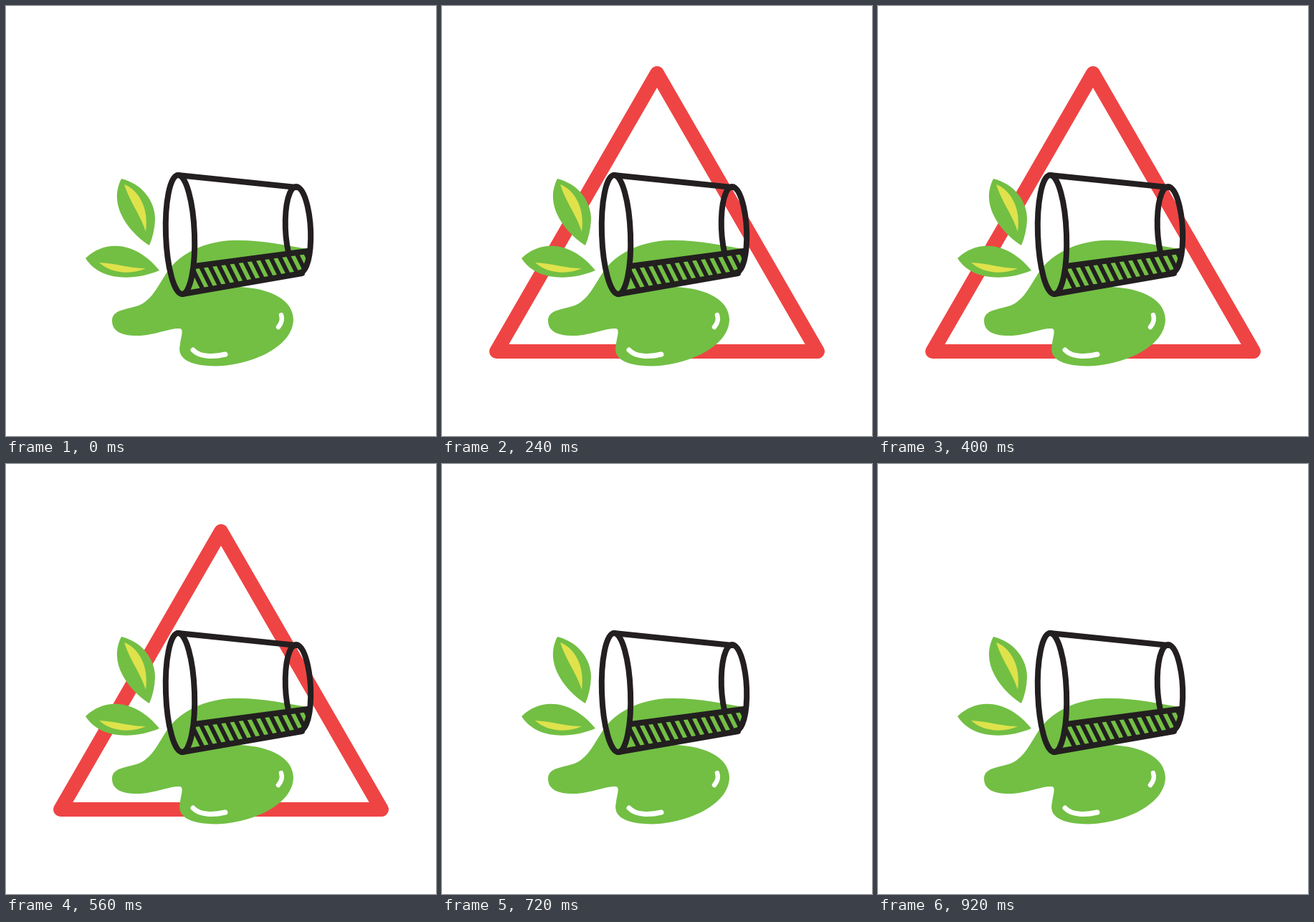
Recreate the animation shown at these times as an HTML page with a canvas. Size 600x600 px, loop 0.96 s.

```html
<!DOCTYPE html>
<html lang="en">
<head>
<meta charset="utf-8">
<title>Spill warning</title>
<style>
  html, body { margin: 0; width: 100%; height: 100%; overflow: hidden; background: #fff; }
  canvas { display: block; width: 600px; height: 600px; }
</style>
</head>
<body>
<canvas id="stage" width="600" height="600"></canvas>
<script>
const ctx = document.getElementById('stage').getContext('2d');
const LOOP = 960, SIGN_ON = 240, SIGN_OFF = 720;
const GREEN = '#72bf44', INK = '#231f20', RED = '#ef4444', YELLOW = '#dfe24b';

const shapes = {
  sign: 'M300 94 L524 482 H76 Z',
  puddle: 'M421 339 C390 334 355 326 318 327 C277 328 243 345 225 371 ' +
    'C211 392 207 404 191 415 C176 424 148 421 148 439 C148 456 165 461 188 460 ' +
    'C212 458 226 450 242 450 C249 450 244 462 243 472 C238 491 254 502 293 502.5 ' +
    'C346 501 401 474 401 437 C400 410 370 394 325 392 L413 373 Z',
  upperLeaf: 'M161 241 C190 248 208 272 208 298 Q207 318 200 334 C174 318 141 279 161 241 Z',
  upperVein: 'M165 249 C184 256 200 281 195 315 C188 292 174 276 165 249 Z',
  lowerLeaf: 'M111 352 C142 323 184 332 214 369 C178 384 131 384 111 352 Z',
  lowerVein: 'M130 358 C155 359 171 366 195 366 C175 375 148 374 130 358 Z',
  liquid: 'M263 362 L421 342 Q419 362 413 373 L247 402 Q259 390 263 362 Z',
  edges: 'M240 236 L405 253 M246 402 L413 373 M263 363 L421 342',
  lowGlint: 'M261 480 C270 490 290 490 306 486',
  sideGlint: 'M384 431 Q387 440 380 448'
};
for (const name in shapes) shapes[name] = new Path2D(shapes[name]);

function fill(path, color) {
  ctx.fillStyle = color;
  ctx.fill(path);
}

function stroke(path, color, width) {
  ctx.strokeStyle = color;
  ctx.lineWidth = width;
  ctx.stroke(path);
}

function rim(x, y, rx, ry, tilt, from, to) {
  const path = new Path2D();
  path.ellipse(x, y, rx, ry, tilt, from, to);
  stroke(path, INK, 8);
}

function drawHatching() {
  const stripes = new Path2D();
  for (let i = -1; i < 13; i++) {
    const x = 271 + i * 12.2, y = 362 - i * 1.55;
    stripes.moveTo(x - 2, y - 4);
    stripes.lineTo(x + 18, y + 36);
  }
  ctx.save();
  ctx.clip(shapes.liquid);
  stroke(stripes, INK, 6);
  ctx.restore();
}

function drawGlass() {
  fill(shapes.liquid, GREEN);
  drawHatching();
  stroke(shapes.edges, INK, 8);
  rim(243, 319, 20, 83, -0.036, 0, Math.PI * 2);
  rim(407.5, 312, 17.5, 60, -0.05, 2.6, Math.PI * 2.5);
}

function draw(time) {
  ctx.fillStyle = '#fff';
  ctx.fillRect(0, 0, 600, 600);
  ctx.lineCap = ctx.lineJoin = 'round';

  if (time >= SIGN_ON && time < SIGN_OFF) stroke(shapes.sign, RED, 20);

  fill(shapes.puddle, GREEN);
  fill(shapes.upperLeaf, GREEN);
  fill(shapes.upperVein, YELLOW);
  fill(shapes.lowerLeaf, GREEN);
  fill(shapes.lowerVein, YELLOW);
  drawGlass();
  stroke(shapes.lowGlint, '#fff', 7);
  stroke(shapes.sideGlint, '#fff', 6.5);
}

const start = performance.now();
function tick() {
  draw((performance.now() - start) % LOOP);
  requestAnimationFrame(tick);
}
tick();
</script>
</body>
</html>
```
